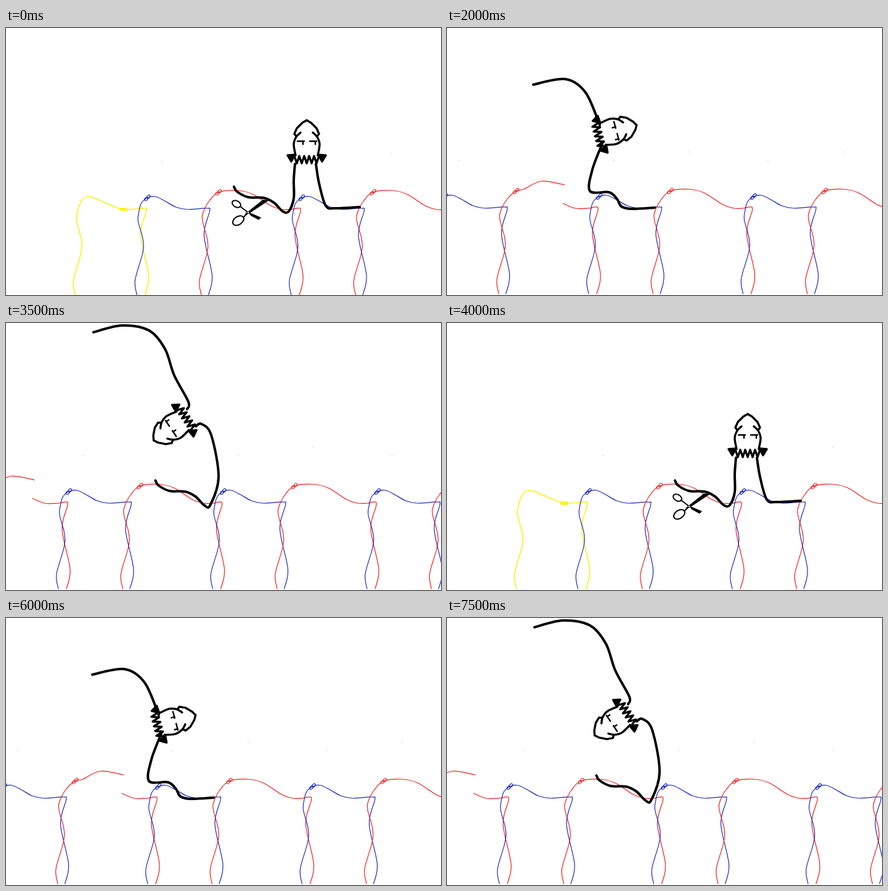
Animation of 706 by 434 pixels, one loop 8000 ms. Source, as an HTML page with a canvas:

```html
<!DOCTYPE html>
<html lang="en">
<head>
<meta charset="utf-8">
<title>Squid on the threads</title>
<style>
html, body { margin: 0; width: 100%; height: 100%; overflow: hidden; background: #fff; }
canvas { display: block; }
</style>
</head>
<body>
<canvas id="stage" width="706" height="434"></canvas>
<script>
const ctx = document.getElementById('stage').getContext('2d');
const STEP = 250.5; // distance between equal threads
const RED = '#f01c1c', BLUE = '#1c28b8', YELLOW = '#f8f000';

const shift = (p, dx) => p.map((v, i) => i % 2 ? v : v + dx);

// Every thread rises from a foot, arches over and falls in a tail.
// Key points are flat x,y lists; x counts from the red knot.
const foot = [-28,432, -31,408, -19,365, -18,343, -26,312, -25,298];
const tail = [129,291, 133,296, 124,335, 137,400, 131,432];
const redRise = [-15,279, 0,265];
const redArch = [30,262, 55,268, 85,287, 103,293];
const blueArch = [125,283, 135,274, 148,272, 163,279, 181,289, 200,293];
const yellowArch = [28,279, 41,272, 71,284, 96,293];
const cutEnd = [13,262, 41,249, 79,255];
const cutStart = [76,285, 96,293];

// Stretches of arm that lie along a thread
const redHold = [25,256, 30,264, 48,273, 73,274, 90,282, 104,296, 114,296];
const blueHold = [120,265, 151,267, 164,278, 171,290, 188,294, 225,292];
const nextHold = shift(redHold, STEP);

// x: red knot on the stage, y: drop of the scene, head: x, y, degrees
const firstStand = {
  x: 345, y: 2, head: [143, 187, 0], scissors: true,
  arms: [[...redHold, 122,275, 122,245, 124,219], [158,219, 163,250, 174,287, 190,291, 229,289]]
};
const stand = { ...firstStand, y: 0 };
const wave = {
  x: 187, y: 0, head: [95, 190, 0],
  arms: [[-49,160, 6,154, 23,154, 32,168, 28,205, 50,235, 70,236, 80,221], [109,220, ...blueHold]]
};
const swing = {
  x: 112, y: 0, head: [158, 168, 75],
  arms: [[28,92, 80,83, 113,105, 136,158], [140,188, 124,230, ...blueHold]]
};
const hang = {
  x: 37, y: 0, head: [246, 210, 180],
  arms: [[233,177, 205,168, 163,182, 123,217, 114,240, ...blueHold],
    [...nextHold, 373,257, 353,207, 308,175, 275,169, 262,178]]
};
const fling = {
  x: -33, y: 0, head: [305, 169, 236],
  arms: [[175,15, 221,4, 265,12, 291,42, 306,85, 329,128, 327,140],
    [...nextHold, 378,250, 366,182, 350,164, 341,168]]
};

const schedule = [
  [0, firstStand], [1000, wave], [2000, swing], [2500, hang], [3500, fling],
  [4000, stand], [5000, wave], [6000, swing], [6500, hang], [7500, fling]
];

function pen(color, width) {
  ctx.strokeStyle = ctx.fillStyle = color;
  ctx.lineWidth = width;
}

function trace(p) {
  ctx.beginPath();
  for (let i = 0; i < p.length; i += 2) ctx.lineTo(p[i], p[i + 1]);
}

function line(p) { trace(p); ctx.stroke(); }
function fill(p) { trace(p); ctx.fill(); }

// Catmull-Rom curve through all points
function curve(p) {
  const last = p.length / 2 - 1;
  const at = i => { const k = 2 * Math.max(0, Math.min(last, i)); return [p[k], p[k + 1]]; };
  ctx.beginPath();
  ctx.moveTo(p[0], p[1]);
  for (let i = 0; i < last; i++) {
    const [a, b, c, d] = [at(i - 1), at(i), at(i + 1), at(i + 2)];
    ctx.bezierCurveTo(b[0] + (c[0] - a[0]) / 6, b[1] + (c[1] - a[1]) / 6,
      c[0] - (d[0] - b[0]) / 6, c[1] - (d[1] - b[1]) / 6, c[0], c[1]);
  }
  ctx.stroke();
}

function ring(x, y, rx, ry, deg) {
  ctx.beginPath();
  ctx.ellipse(x, y, rx, ry, deg * Math.PI / 180, 0, 7);
  ctx.stroke();
}

function knot(x, y, deg) {
  const a = deg * Math.PI / 180;
  for (const r of [-2.6, 2.6]) ring(x + r * Math.cos(a), y + r * Math.sin(a), 3.2, 2.2, deg);
}

function yellowThread() {
  pen(YELLOW, 1.4);
  curve([...shift(foot, 46), ...yellowArch, ...tail]);
  knot(96, 293, 0);
}

function redThread(cut) {
  pen(RED, 1.2);
  const start = [...foot, ...redRise];
  if (cut) {
    curve([...start, ...cutEnd]);
    curve([...cutStart, 118,293, ...tail]);
  } else curve([...start, ...redArch, 118,293, ...tail]);
  knot(0, 265, -42);
}

function blueThread() {
  pen(BLUE, 1.2);
  curve([...shift(foot, 146), ...blueArch, ...shift(tail, 103)]);
  knot(135, 274, -45);
}

function threads(cut) {
  for (let i = -1; i < 4; i++) {
    ctx.save();
    ctx.translate(i * STEP, 0);
    if (i < 0) yellowThread();
    else redThread(cut && i === 0);
    blueThread();
    ctx.fillStyle = '#999';
    if (i > 0) ctx.fillRect(30, 201, 1, 1);
    ctx.fillRect(158, 215, 1, 1);
    ctx.restore();
  }
}

function head([x, y, deg]) {
  ctx.save();
  ctx.translate(x, y);
  ctx.rotate(deg * Math.PI / 180);
  for (const side of [-1, 1]) {
    ctx.save();
    ctx.scale(side, 1);
    pen('#000', 3.4);
    line([0,-39, 7,-35, 16,-26, 20,-17, 17,-13]);
    curve([10,-19, 17,-12, 21,0, 18,18]);
    fill([31,18, 19,16, 25,29]);
    line([31,18, 19,17, 25,28, 31,18]);
    ctx.restore();
    pen('#000', 2.4);
    const eye = side * 10;
    line([eye - 5,-5, eye + 6,-5]);
    line([eye + 4,-5, eye + 4,0]);
  }
  pen('#000', 3.4);
  const teeth = [];
  for (let i = 0; i < 11; i++) teeth.push(-20 + 4 * i, i % 2 ? 31 : 19);
  line(teeth);
  ctx.restore();
}

function scissors() {
  pen('#000', 2);
  ring(29, 284, 7.5, 5, 30);
  ring(32, 311, 10, 6.5, -35);
  line([35,288, 48,298, 40,306]);
  fill([42,301, 72,277, 82,278, 49,300]);
  fill([48,297, 69,306, 65,310, 52,303]);
  ctx.fillStyle = '#fff';
  ctx.fillRect(47, 297, 2, 2);
}

function draw(now) {
  const t = now % 8000;
  const pose = schedule.findLast(([start]) => start <= t)[1];
  ctx.fillStyle = '#fff';
  ctx.fillRect(0, 0, 706, 434);
  ctx.save();
  ctx.translate(pose.x, pose.y);
  ctx.lineJoin = ctx.lineCap = 'round';
  threads(!pose.scissors);
  pen('#000', 4);
  pose.arms.forEach(curve);
  head(pose.head);
  if (pose.scissors) scissors();
  ctx.restore();
}

const begin = performance.now();
function tick() {
  draw(performance.now() - begin);
  requestAnimationFrame(tick);
}
tick();
</script>
</body>
</html>
```
